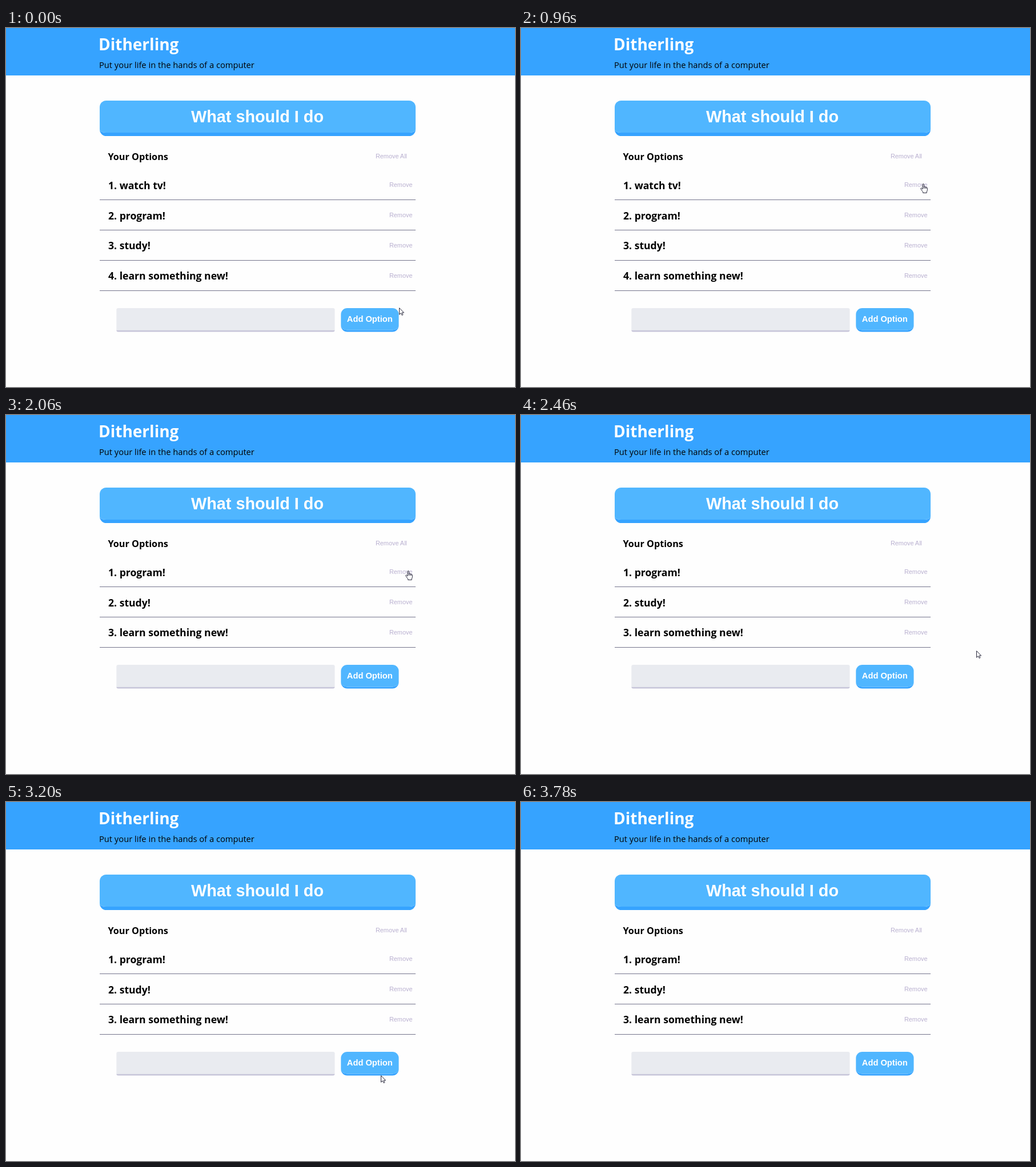
An HTML page that plays this animation: 891 by 628 pixels, repeating every 4.5 s.

```html
<!DOCTYPE html>
<html lang="en">
<head>
<meta charset="utf-8">
<title>Options list</title>
<style>
html, body { margin: 0; width: 100%; height: 100%; overflow: hidden; background: #fefefe; }
svg { display: block; width: 100%; height: 100%; }
text { white-space: pre; }
.ui { font-family: "Open Sans", "Noto Sans", sans-serif; }
.btn { font-family: "Liberation Sans", Arial, sans-serif; font-weight: 700; fill: #fff; text-anchor: middle; }
.link { font: 10.9px "Liberation Sans", Arial, sans-serif; fill: #b9b0d0; }
.item { font-size: 17.6px; font-weight: 700; }
.cursor { fill: #fff; stroke: #26263a; stroke-width: 1; stroke-linejoin: round; }
</style>
</head>
<body>
<svg viewBox="0 0 891 628" xmlns="http://www.w3.org/2000/svg">
  <rect width="891" height="83" fill="#36a3ff"/>
  <text class="ui" x="162" y="39" font-size="28" font-weight="700" fill="#fff">Ditherling</text>
  <text class="ui" x="163" y="70" font-size="14.7">Put your life in the hands of a computer</text>
  <g id="ask"></g>
  <text class="ui" x="178.5" y="231" font-size="16.2" font-weight="700">Your Options</text>
  <text class="link" x="646.9" y="228">Remove All</text>
  <g id="list"></g>
  <g id="form"></g>
  <rect id="focus" x="671" y="253" width="41" height="42.5" fill="none" stroke="#6c9cf2" stroke-width="1.4"/>
  <path id="arrow" class="cursor" d="M.5 .7V12.2L3.2 9.7L5.2 13.5L6.9 12.7L5.1 9H8.6Z"/>
  <g id="hand" class="cursor">
    <path d="M4 10V1.9Q4 .6 5.1 .6T6.2 1.9V6Q6.4 5.2 7.3 5.3T8.3 6.3Q8.6 5.7 9.4 5.9T10.3 7Q10.7 6.5 11.4 6.8T12.3 8V11.5Q12.3 13 11.2 14.2V16.4H4.6V14.6Q2.6 12.4 .8 9.4Q.5 8.4 1.3 8T2.7 8.4Z"/>
    <path d="M6.2 6V8.8M8.3 6.3V8.8M10.3 7V9" fill="none"/>
  </g>
</svg>
<script>
const LOOP = 4500, REMOVED = 2060, ROW = 53;
const TASKS = ["watch tv!", "program!", "study!", "learn something new!"];

// start time, shape, x, y
const POINTER = [
  [0, "arrow", 688, 489],
  [280, "arrow", 738, 430],
  [400, "arrow", 774, 378],
  [550, "arrow", 720, 273],
  [830, "hand", 703, 272],
  [960, "hand", 699, 272],
  [2310, "arrow", 742, 289],
  [2460, "arrow", 797, 412],
  [2590, "arrow", 850, 562],
  [2740, ""],
  [3050, "arrow", 684, 510],
  [3200, "arrow", 656, 478],
  [3330, "arrow", 712, 511],
  [3480, "arrow", 834, 615],
  [3640, "arrow", 833, 623],
  [3780, ""]
];

const $ = id => document.getElementById(id);
const show = (el, on) => el.setAttribute("visibility", on ? "visible" : "hidden");
const moveTo = (el, x, y) => el.setAttribute("transform", `translate(${x} ${y})`);

// Rounded box with a thicker bottom edge, like a CSS border-bottom
function box(x, y, w, h, r, edge, fill, edgeFill) {
  const ry = Math.max(r - edge, 0), top = y + r, bottom = y + h - edge;
  const arc = (dx, dy, radius) => `a${r} ${radius} 0 0 1 ${dx} ${dy}`;
  const lower = `V${bottom - ry}${arc(-r, ry, ry)}H${x + r}${arc(-r, -ry, ry)}Z`;
  const base = `V${y + h - r}${arc(-r, r, r)}H${x + r}${arc(-r, -r, r)}V${bottom - ry}` +
    `${`a${r} ${ry} 0 0 0 ${r} ${ry}`}H${x + w - r}a${r} ${ry} 0 0 0 ${r} ${-ry}Z`;
  return `<path fill="${edgeFill}" d="M${x + w} ${bottom - ry}${base}"/>
    <path fill="${fill}" d="M${x} ${top}${arc(r, -r, r)}H${x + w - r}${arc(r, r, r)}${lower}"/>`;
}

function row(task, i) {
  const shift = ROW * i, textY = 282 + Math.floor(52.8 * i + 0.3);
  return `<text class="ui item" x="179" y="${textY}">${i + 1}. ${task}</text>
    <text class="link" x="670.9" y="${278 + shift}">Remove</text>
    <rect x="164" y="${300 + shift}" width="553" height="1" fill="#74748c"/>`;
}

$("ask").innerHTML = box(164, 127, 553, 62, 11.5, 6, "#50b6ff", "#36a3ff") +
  `<text class="btn" x="440" y="165" font-size="28.8">What should I do</text>`;
$("form").innerHTML = box(193.3, 490, 382.2, 41.4, 3, 3, "#e9ebf0", "#c8c6da") +
  box(586.3, 490, 101.2, 41.4, 11, 3, "#50b6ff", "#36a3ff") +
  `<text class="btn" x="636.8" y="514" font-size="14.7">Add Option</text>`;

let count = 0;
function setList(tasks) {
  if (tasks.length === count) return;
  count = tasks.length;
  $("list").innerHTML = tasks.map(row).join("");
  moveTo($("form"), 0, ROW * (count - TASKS.length));
}

function render(t) {
  setList(t < REMOVED ? TASKS : TASKS.slice(1));
  show($("focus"), t >= 1920 && t < REMOVED);
  const [, shape, x, y] = POINTER.findLast(p => p[0] <= t);
  for (const id of ["arrow", "hand"]) show($(id), id === shape);
  if (shape) moveTo($(shape), x, y);
}

const start = performance.now();
function tick() {
  render((performance.now() - start) % LOOP);
  requestAnimationFrame(tick);
}
tick();
</script>
</body>
</html>
```
